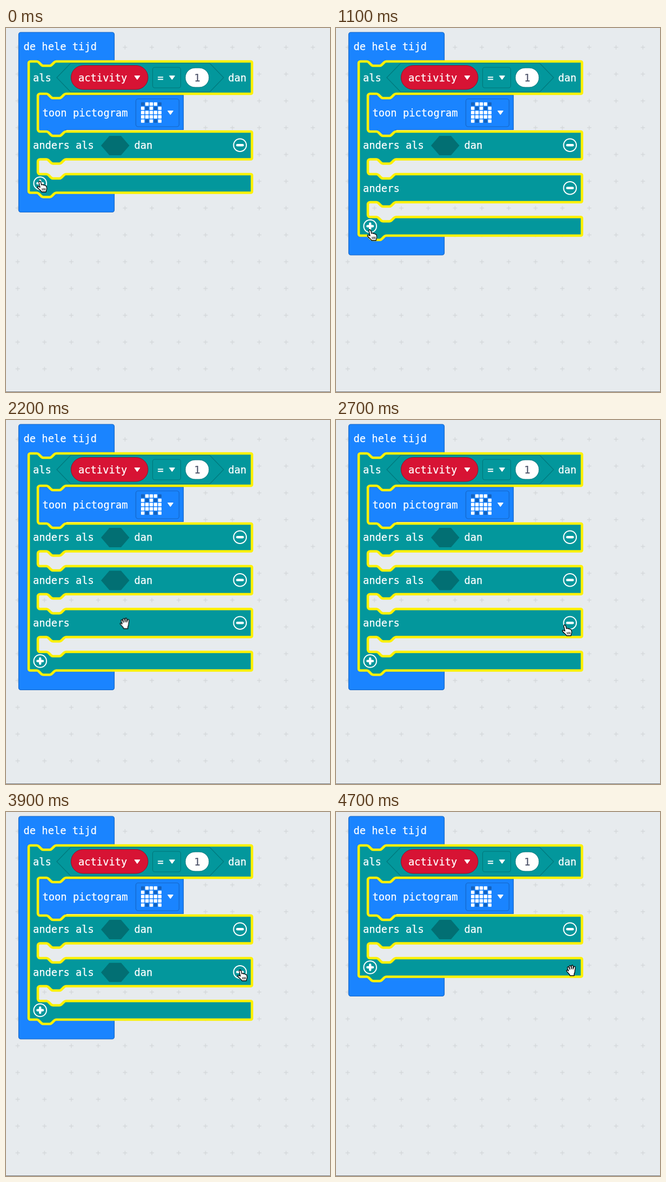
An HTML page that plays this animation: 600 px wide and 675 px high, repeating every 4.8 s.

```html
<!DOCTYPE html>
<html lang="nl">
<head>
<meta charset="utf-8">
<title>Blokken</title>
<style>
  html, body { margin: 0; width: 100%; height: 100%; overflow: hidden; background: #e7ebee; }
  svg { display: block; width: 600px; height: 675px; }
  text { font: 18.75px "DejaVu Sans Mono", monospace; fill: #fff; stroke: #fff; stroke-width: .25; white-space: pre; }
  .blue { fill: #1a84ff; stroke: #1466c6; stroke-width: 1.2; }
  .teal { fill: #03979c; stroke: #fff100; stroke-width: 4.6; stroke-linejoin: round; }
  .line { fill: none; stroke: #02777b; stroke-width: 1.1; }
  .slot { fill: #026f73; }
  .ring { fill: none; stroke: #fff; stroke-width: 2; }
  .sign { fill: none; stroke: #fff; stroke-width: 4.4; stroke-linecap: round; }
  .white { fill: #fff; }
  .dim { fill: #1462bd; }
  .skin { fill: #fff; stroke: #000; stroke-width: 1.3; stroke-linejoin: round; }
  .crease { fill: none; stroke: #000; stroke-width: 1.1; stroke-linecap: round; }

  .rows1, .rows2, .rows3, .elseif, .point, .open, .arrow { animation: 4.8s step-end infinite; }
  .rows1 { animation-name: rows1; }
  .rows2 { animation-name: rows2; }
  .rows3 { animation-name: rows3; }
  .elseif { animation-name: elseif; }
  .point { animation-name: point; }
  .open { animation-name: open; }
  .arrow { animation-name: arrow; }
  #cursor { animation: move 4.8s linear infinite; }

  @keyframes rows1 { 0%, 83.3333%, 100% { opacity: 1 } 6.25% { opacity: 0 } }
  @keyframes rows2 { 0%, 29.1666%, 83.3333%, 100% { opacity: 0 } 6.25%, 64.5833% { opacity: 1 } }
  @keyframes rows3 { 0%, 64.5833%, 100% { opacity: 0 } 29.1666% { opacity: 1 } }
  @keyframes elseif { 0%, 83.3333%, 100% { opacity: 0 } 29.1666% { opacity: 1 } }
  @keyframes point {
    0%, 18.75%, 52.0833%, 70.8333%, 100% { opacity: 1 }
    6.25%, 29.1666%, 64.5833%, 83.3333% { opacity: 0 }
  }
  @keyframes open {
    0%, 18.75%, 52.0833%, 100% { opacity: 0 }
    6.25%, 29.1666%, 83.3333% { opacity: 1 }
  }
  @keyframes arrow { 0%, 70.8333%, 100% { opacity: 0 } 64.5833% { opacity: 1 } }
  @keyframes move {
    0% { transform: translate(57px, 283px) }
    12.5% { transform: translate(57px, 283px); animation-timing-function: steps(4) }
    20.8333% { transform: translate(57px, 373px) }
    31.25% { transform: translate(57px, 373px); animation-timing-function: steps(2) }
    35.4166% { transform: translate(55px, 357px) }
    39.5833% { transform: translate(55px, 357px); animation-timing-function: steps(7) }
    54.1666% { transform: translate(418px, 379px) }
    64.5833% { transform: translate(418px, 379px); animation-timing-function: steps(2) }
    68.75% { transform: translate(425px, 324px); animation-timing-function: steps(2) }
    72.9166% { transform: translate(428px, 292px) }
    83.3333% { transform: translate(428px, 292px); animation-timing-function: steps(2) }
    87.5% { transform: translate(426px, 283px) }
    99.9999% { transform: translate(426px, 283px); animation-timing-function: step-end }
    100% { transform: translate(57px, 283px) }
  }
</style>
</head>
<body>
<svg viewBox="0 0 600 675">
  <defs>
    <pattern id="grid" x="-3.2" y="11" width="49.7" height="49.7" patternUnits="userSpaceOnUse">
      <path d="M20.8 24.8h8M24.8 20.8v8" stroke="#d1d5d8" stroke-width="1.2"/>
    </pattern>
  </defs>
  <rect width="600" height="675" fill="#e7ebee"/>
  <rect width="600" height="665" fill="url(#grid)"/>
  <rect y="674" width="600" height="1" fill="#77797b"/>

  <g id="stack"></g>

  <text x="32.5" y="41">de hele tijd</text>
  <text x="50" y="99">als</text>
  <path class="line" d="M94 92L119.500 65.500H377.500L403 92L377.500 118.500H119.500Z"/>
  <rect x="120.500" y="69.500" width="142.500" height="44.500" rx="22.250" fill="#d71334" stroke="#980c25"/>
  <text x="134" y="99">activity</text>
  <rect class="line" x="271.500" y="73" width="52" height="38" rx="4"/>
  <text x="280.500" y="99">=</text>
  <rect class="white" x="332" y="74" width="44" height="36" rx="18" stroke="#02777b"/>
  <text x="348.400" y="99" style="fill:#4f566b;stroke:#4f566b">1</text>
  <text x="411.500" y="99">dan</text>
  <text x="67.500" y="164">toon pictogram</text>
  <rect x="240.500" y="131.500" width="80" height="51.500" rx="4" fill="none" stroke="#1466c6" stroke-width="1.2"/>
  <g id="icon"></g>
  <g id="carets"></g>

  <g id="cursor">
    <g class="point">
      <path class="skin" d="M6 12.500L4 3.800Q3.600 1.200 5.400 1Q7 1 7.500 3L8.800 8Q9.800 6.500 11.500 7.400L12 8.400Q13.600 7.200 14.900 8.600L15.300 9.600Q17.300 8.800 18 11Q19.200 15 17.600 18L17.200 21H9Q8 18.500 5 16.500Q1.500 13.500 1.200 12Q1.600 10.300 3.400 11.200Z"/>
      <path class="crease" d="M10 14.500l.4 3.500M12.700 14.300l.2 3.700M15.200 14.300v3.500"/>
    </g>
    <g class="open">
      <path class="skin" d="M4.600 11.800L2.600 6.400Q2.200 4.400 3.800 4.200Q5 4.200 5.700 6L7 9L5.800 3.400Q5.800 1.800 7.200 1.600Q8.600 1.600 9 3.200L10 8V2.600Q10.200 1 11.600 1Q13 1.200 13 2.800V8.400L14.300 4.400Q14.900 3 16.200 3.400Q17.600 4 17.200 5.600L16.400 11Q16.500 15 15 17.200V20.500H7.400Q6.800 18 4 15.400Q1 12.600 .8 11.400Q1 9.800 2.800 10.400Z"/>
    </g>
    <g class="arrow">
      <path d="M5 1V18.200L8.900 14.600L11.700 21.200L14.700 19.900L11.900 13.500H17.300Z" fill="#000" stroke="#fff" stroke-width="1.3" stroke-linejoin="round"/>
    </g>
  </g>
</svg>
<script>
  const STEP = 79.5; // height of one extra branch
  const byId = id => document.getElementById(id);
  const NOTCH = "c2 0 3 1 4 2l4 4c1 1 2 2 4 2h12c2 0 3-1 4-2l4-4c1-1 2-2 4-2";
  const NOTCH_BACK = "c-2 0-3 1-4 2l-4 4c-1 1-2 2-4 2h-12c-2 0-3-1-4-2l-4-4c-1-1-2-2-4-2";

  const rightSide = bottom => `H453.500a2 2 0 0 1 2 2V${bottom - 2}a2 2 0 0 1-2 2`;
  const mouth = (top, bottom) =>
    `H111${NOTCH_BACK}H63a4 4 0 0 0-4 4V${bottom - 4}a4 4 0 0 0 4 4H75${NOTCH}`;

  function condBlock(n) {
    let d = `M42 65a3 3 0 0 1 3-3H57${NOTCH}${rightSide(122)}${mouth(122, 192)}`;
    for (let i = 0; i < n; i++) {
      const y = i * STEP;
      d += rightSide(243.5 + y) + mouth(243.5 + y, 271 + y);
    }
    return d + `${rightSide(305.5 + (n - 1) * STEP)}H93${NOTCH_BACK}H45a3 3 0 0 1-3-3Z`;
  }

  function loopBlock(n) {
    const end = 341.5 + (n - 1) * STEP;
    return `M27.500 8H196.500a4 4 0 0 1 4 4V72H50V${end - 42}H200.500V${end - 4}a4 4 0 0 1-4 4H27.500a4 4 0 0 1-4-4V12a4 4 0 0 1 4-4Z`;
  }

  const button = (x, y, sign) =>
    `<g transform="translate(${x} ${y})"><circle class="ring" r="11.800"/><path class="sign" d="${sign}"/></g>`;

  function branch(i, n) {
    const condition = `<text x="129" y="224">als</text><text x="237.500" y="224">dan</text>
      <path class="slot" d="M176 218L191.500 200H213L228.500 218L213 236H191.500Z"/>`;
    const extra = i === 0 || i < n - 1 ? condition
      : n === 2 ? `<g class="elseif">${condition}</g>` : "";
    return `<g transform="translate(0 ${i * STEP})"><text x="50" y="224">anders</text>${extra}
      ${button(433.3, 217.2, "M-5 0h10")}</g>`;
  }

  byId("stack").innerHTML = [1, 2, 3].map(n => `<g class="rows${n}">
    <path class="blue" d="${loopBlock(n)}"/>
    <path class="blue" d="M60 124.500H328.500V188.500H111V201H60Z"/>
    <path class="teal" d="${condBlock(n)}"/>
    ${Array.from({ length: n }, (_, i) => branch(i, n)).join("")}
    ${button(63.2, 288 + (n - 1) * STEP, "M-4.800 0h9.600M0-4.800v9.600")}
  </g>`).join("");

  byId("icon").innerHTML = [..."0111010101111111111110101"].map((on, i) =>
    `<rect class="${on === "1" ? "white" : "dim"}" x="${250 + i % 5 * 7.9}" y="${137.8 + Math.floor(i / 5) * 7.9}" width="6.400" height="6.400" rx="1"/>`
  ).join("");

  byId("carets").innerHTML = [[243, 92], [307.5, 92], [304.5, 157]].map(([x, y]) =>
    `<path class="white" stroke="#fff" stroke-linejoin="round" d="M${x - 5} ${y - 3.3}h10l-5 7Z"/>`
  ).join("");
</script>
</body>
</html>
```
